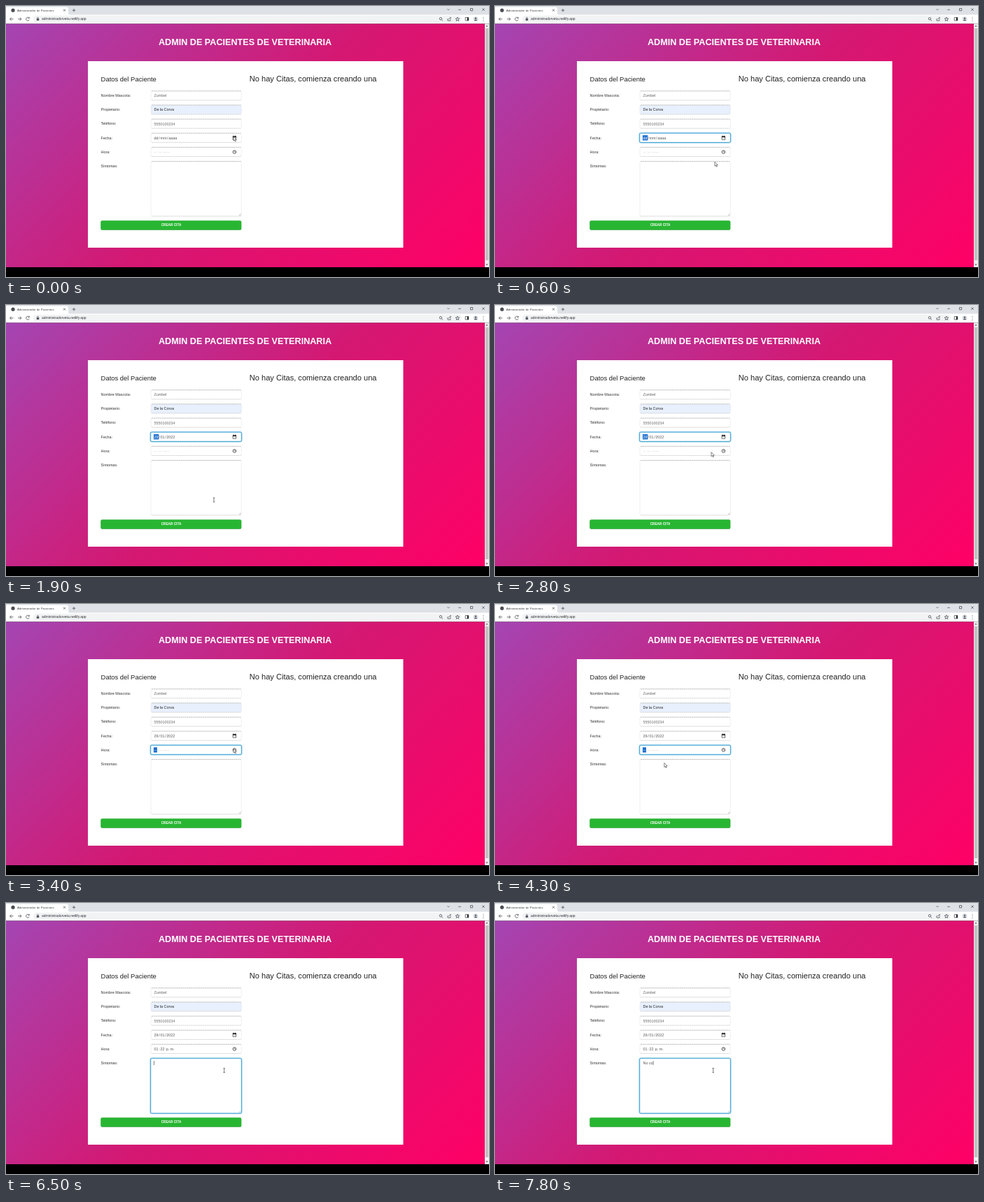
Animation of 690 by 388 pixels, one loop 8 s. Source, as an HTML page:

```html
<!DOCTYPE html>
<html lang="es">
<head>
<meta charset="utf-8">
<title>Administrador de Pacientes</title>
<style>
  html, body { margin: 0; width: 100%; height: 100%; overflow: hidden; background: #000; }
  svg { display: block; width: 690px; height: 388px; }
  text { font-family: "Liberation Sans", Arial, sans-serif; white-space: pre; }
  .line { fill: none; stroke: #50545a; stroke-width: .8; }
</style>
</head>
<body>
<svg id="stage" viewBox="0 0 690 388" xmlns="http://www.w3.org/2000/svg">
  <defs>
    <linearGradient id="bg" gradientUnits="userSpaceOnUse" x1="84" y1="-58" x2="600" y2="458">
      <stop offset="0" stop-color="#a445b2"/>
      <stop offset=".5" stop-color="#d41872"/>
      <stop offset="1" stop-color="#ff0066"/>
    </linearGradient>
  </defs>
  <rect width="690" height="388"/>

  <g id="browser">
    <rect width="690" height="13" fill="#dee1e6"/>
    <path d="M0 13V1.5H86q3 0 3 3V10q0 3 3 3z" fill="#fff"/>
    <rect y="12.5" width="690" height="13" fill="#fff"/>
    <rect x="39" y="13.8" width="612" height="10" rx="5" fill="#f1f3f4"/>
    <circle cx="10" cy="6.2" r="2.6" fill="#4a4d52"/>
    <text x="16" y="8" font-size="4.3" fill="#3c4043">Administrador de Pacientes</text>
    <text x="51" y="20.4" font-size="5" fill="#303338">administradorveta.netlify.app</text>
    <path class="line" d="M82 4.6l3 3m0-3l-3 3M94.800 6.200h4.400m-2.200-2.200v4.400"/>
    <path class="line" d="M10.500 18.700h-5m2.300-2.300l-2.300 2.300l2.300 2.300M17 18.700h5m-2.300-2.300l2.300 2.300l-2.300 2.300"/>
    <path class="line" d="M33 17.200a2.400 2.400 0 1 0 .3 2.300M33.300 15.800v1.800h-1.800"/>
    <rect x="43.800" y="18" width="3.400" height="2.800" fill="#50545a"/>
    <path class="line" d="M44.600 18v-.7a.9.900 0 0 1 1.800 0v.7"/>
    <circle class="line" cx="621" cy="18.200" r="1.700"/>
    <path class="line" d="M622.200 19.500l1.800 1.800M631 18v3h4v-2M632.500 19q.5-2 3-2m-1-1.200l1.200 1.200l-1.200 1.200"/>
    <path class="line" d="M645 16l.8 1.900l2 .1l-1.600 1.300l.6 2l-1.800-1.100l-1.800 1.100l.6-2l-1.600-1.300l2-.1z"/>
    <path class="line" stroke-width="1" d="M656.200 16.500h4.600v4.400h-4.600z"/>
    <rect x="658.800" y="16.500" width="2" height="4.400" fill="#202124"/>
    <circle cx="671" cy="18.700" r="3.400" fill="#d5d9df"/>
    <circle cx="671" cy="17.600" r="1.200" fill="#50545a"/>
    <path d="M668.800 21q2.200-2.800 4.400 0z" fill="#50545a"/>
    <path d="M682 16.200v.1m0 2.400v.1m0 2.400v.1" stroke="#50545a" stroke-width="1.100" stroke-linecap="round"/>
    <path class="line" d="M630.500 4.300l1.500 1.500l1.500-1.500M646.300 5.300h3.600M663.500 3.500h3.200v3.200h-3.200zM680.300 3.500l3.300 3.300m0-3.300l-3.300 3.300"/>
  </g>

  <rect y="25.500" width="684" height="348.500" fill="url(#bg)"/>
  <rect x="684" y="25.500" width="6" height="348.500" fill="#f1f1f1"/>
  <rect x="684.800" y="32" width="4.400" height="332" fill="#c1c1c1"/>
  <path d="M685.500 29.500l1.500-2l1.500 2zM685.500 369.500l1.500 2l1.500-2z" fill="#555"/>

  <text x="218" y="56.400" font-size="12.620" font-weight="bold" fill="#fff">ADMIN DE PACIENTES DE VETERINARIA</text>
  <rect x="117" y="79" width="450.500" height="267" fill="#fff"/>
  <text x="135.600" y="108" font-size="9.450" fill="#222">Datos del Paciente</text>
  <text x="347.800" y="108" font-size="11.080" fill="#222">No hay Citas, comienza creando una</text>

  <g id="form"></g>
  <rect x="135.500" y="307.500" width="200.700" height="13.200" rx="1.600" fill="#1f9a2b"/>
  <rect x="135.500" y="307.500" width="200.700" height="12.500" rx="1.600" fill="#28b632"/>
  <text x="236" y="314.900" font-size="4.700" font-weight="bold" fill="#fff" text-anchor="middle">CREAR CITA</text>

  <g id="focus" fill="none">
    <rect rx="2.200" stroke="#bfe3f5" stroke-width="2.200"/>
    <rect rx="2" stroke="#3d9fcf" stroke-width=".9"/>
  </g>
  <rect id="mark" x="210.900" height="7.400" fill="#1b6fd0"/>
  <g id="values"></g>

  <g fill="#222">
    <path d="M323.800 186.200h5.200v5.400h-5.200z M324.500 188v2.900h3.800v-2.900z" fill-rule="evenodd"/>
    <path d="M324.600 185.500h.8v1h-.8zm2.800 0h.8v1h-.8z"/>
    <circle cx="326.400" cy="209" r="2.300" fill="none" stroke="#333" stroke-width=".8"/>
    <path d="M326.400 207.500v1.600h1.100" fill="none" stroke="#333" stroke-width=".6"/>
  </g>
  <path id="caret" stroke="#333" stroke-width=".6"/>

  <path id="arrow" d="M0 0v6l1.400-1.200l1 2.200l1-.4l-1-2.200h1.900z" fill="#fff" stroke="#333" stroke-width=".6"/>
  <path id="beam" d="M-1.300-3h2.600M0-3v6M-1.300 3h2.600" stroke="#444" stroke-width=".7" fill="none"/>
</svg>

<script>
const LOOP = 8000, LEFT = 211.5, SIZE = 5.4;
const DATE_AT = 300, DATE_SET = 1900, TIME_AT = 3300, TIME_SET = 4700, AREA_AT = 6300;
const $ = id => document.getElementById(id);

function make(parent, tag, attrs, content = '') {
  const el = document.createElementNS('http://www.w3.org/2000/svg', tag);
  for (const key in attrs) el.setAttribute(key, attrs[key]);
  el.textContent = content;
  parent.append(el);
  return el;
}
const write = (parent, x, y, content, fill = '#555') =>
  make(parent, 'text', { x, y, 'font-size': SIZE, fill }, content);

const rowY = i => 128.3 + i * 20.15;
const labels = ['Nombre Mascota:', 'Propietario:', 'Teléfono:', 'Fecha:', 'Hora:', 'Sintomas:'];
const filled = ['Zumbel', 'De la Corva', '5550100234'];

labels.forEach((label, i) => {
  const form = $('form'), y = rowY(i), top = y - 6.6;
  const height = i === 5 ? 78.5 : 13.2;
  write(form, 135.6, y + 1.8, label, '#333');
  make(form, 'rect', { x: 207, y: top, width: 129.3, height, rx: 2,
    fill: i === 1 ? '#e8f0fe' : '#fff', stroke: '#e4e4e4', 'stroke-width': .6 });
  make(form, 'path', { d: `M208 ${top}H335.500`, stroke: '#aaa', 'stroke-width': .7, 'stroke-dasharray': '2 .8' });
  make(form, 'path', { d: `M208 ${top + height}H335.500`, stroke: '#ccc', 'stroke-width': .6, 'stroke-dasharray': '2 .8' });
  if (filled[i]) write(form, LEFT, y + 1.9, filled[i], i === 1 ? '#222' : '#666');
});
make($('form'), 'path', { d: 'M333 300l2.500-2.500M334.500 300l1-1', stroke: '#888', 'stroke-width': .5 });

// Each part is [x offset, text]; the first one can be selected.
const parts = {
  date: [[0, 'dd'], [6.8, '/'], [8.9, 'mm'], [18.6, '/'], [20.7, 'aaaa']],
  dateSet: [[0, '29'], [6.8, '/'], [8.9, '01'], [15.7, '/'], [17.8, '2022']],
  time: [[0, '--'], [5, ':'], [7.2, '--'], [13, '-----']],
  timeSet: [[0, '01'], [6.8, ':'], [8.9, '22'], [17.3, 'p. m.']]
};
const groups = {};
for (const name in parts) {
  const y = rowY(name.startsWith('date') ? 3 : 4) + 1.9;
  groups[name] = make($('values'), 'g', {});
  for (const [dx, part] of parts[name])
    write(groups[name], LEFT + dx, y, part, name === 'time' ? '#c4c4c4' : '#555');
}
const note = write($('values'), LEFT, rowY(5) + 1.9, '');

const path = [
  [0, 325, 187], [300, 325, 187], [1000, 297, 279], [1900, 297, 279],
  [2700, 309, 210.7], [2900, 309, 210.7], [3200, 325, 207], [3400, 325, 207],
  [4100, 241.8, 227.5], [4700, 241.8, 227.5], [5100, 242.5, 223.7],
  [5600, 242.5, 223.7], [6200, 311.7, 239.7], [8000, 311.7, 239.7]
];
const typing = [[6900, 'N'], [7000, 'No'], [7300, 'No '], [7600, 'No c'], [7700, 'No co']];

function cursorAt(t) {
  const i = path.findIndex(p => p[0] > t);
  const [t0, x0, y0] = path[i - 1], [t1, x1, y1] = path[i];
  const u = (t - t0) / (t1 - t0), e = u * u * (3 - 2 * u);
  return [x0 + (x1 - x0) * e, y0 + (y1 - y0) * e];
}
const show = (el, on) => el.setAttribute('visibility', on ? 'visible' : 'hidden');

function draw(t) {
  show(groups.date, t < DATE_SET);
  show(groups.dateSet, t >= DATE_SET);
  show(groups.time, t < TIME_SET);
  show(groups.timeSet, t >= TIME_SET);

  const row = t < DATE_AT ? 0 : t < TIME_AT ? 3 : t < AREA_AT ? 4 : 5;
  const top = rowY(row) - 6.8;
  show($('focus'), row);
  for (const rect of $('focus').children) {
    rect.setAttribute('x', 206.4);
    rect.setAttribute('y', top);
    rect.setAttribute('width', 130.2);
    rect.setAttribute('height', row === 5 ? 79 : 13.6);
  }

  const selecting = row === 3 || row === 4;
  show($('mark'), selecting);
  $('mark').setAttribute('y', rowY(row) - 3.7);
  $('mark').setAttribute('width', row === 4 && t < TIME_SET ? 5 : 7.4);
  for (const name in groups) {
    const own = name.startsWith('date') ? 3 : 4;
    groups[name].firstChild.setAttribute('fill', row === own ? '#fff' : name === 'time' ? '#c4c4c4' : '#555');
  }

  const typed = typing.filter(step => step[0] <= t).pop();
  note.textContent = typed ? typed[1] : '';
  const caretX = LEFT + (typed ? note.getComputedTextLength() + .5 : 0);
  $('caret').setAttribute('d', `M${caretX} ${rowY(5) - 3}v6`);
  show($('caret'), row === 5);

  const beam = (t >= 700 && t < 2300) || t >= 6000;
  const place = `translate(${cursorAt(t).join(' ')})`;
  for (const id of ['arrow', 'beam']) $(id).setAttribute('transform', place);
  show($('beam'), beam);
  show($('arrow'), !beam);
}

const start = performance.now();
function tick() {
  const t = (performance.now() - start) % LOOP;
  draw(Math.floor(t / 100) * 100);
  requestAnimationFrame(tick);
}
tick();
</script>
</body>
</html>
```
